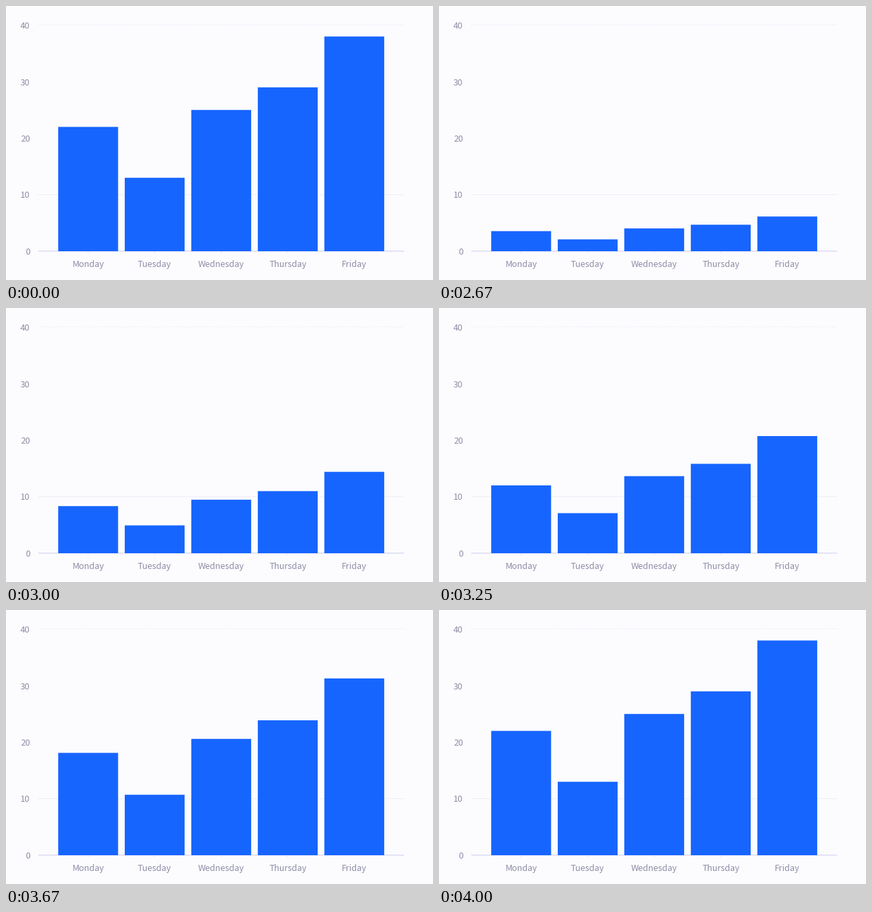
Write a matplotlib script that moves like this. It is 622 by 400 pixels and loops after 4910 ms.

```python
import matplotlib.pyplot as plt
from matplotlib.animation import FuncAnimation
from matplotlib.patches import Rectangle

W, H, DPI = 622, 400, 100
PX = 72 / DPI                      # one pixel in points
LOOP, TICK = 4910, 10              # ms
START, STEP = 2420, 250 / 3        # growth start and step length, ms

DAYS = {"Monday": 22, "Tuesday": 13, "Wednesday": 25, "Thursday": 29, "Friday": 38}
LEFT, RIGHT, BASE, UNIT = 47, 580, 358, 8.25
PITCH = (RIGHT - LEFT) / 5.5
BAR_W = PITCH * 0.9

PAPER, BLUE, INK = "#fcfcff", "#1765ff", "#8e8ea6"
AXIS, AXIS_SOFT, GRID = "#dedef2", "#eaeaf8", "#e0e0ee"

fig = plt.figure(figsize=(W / DPI, H / DPI), dpi=DPI, facecolor=PAPER)
ax = fig.add_axes([0, 0, 1, 1])
ax.set_xlim(0, W)
ax.set_ylim(H, 0)
ax.axis("off")


def block(x, y, w, h, color, z=1):
    box = Rectangle((x, y), w, h, fc=color, lw=0, zorder=z)
    box.set_snap(False)
    return ax.add_patch(box)


def dots(y, gap):
    ax.plot([LEFT, RIGHT], [y, y], color=GRID, lw=PX, ls=(0, (1, gap)),
            dash_capstyle="butt", snap=False, zorder=1)


def label(x, y, text, ha):
    ax.text(x, y, text, ha=ha, va="baseline", color=INK,
            family="Noto Sans CJK JP", fontsize=12.5 * PX)


dots(27.5, 2)
dots(275.5, 1)
block(LEFT, 357, RIGHT - LEFT, 1, AXIS)
block(LEFT, 358, RIGHT - LEFT, 1, AXIS_SOFT)

for value in range(0, 41, 10):
    label(35, BASE + 5 - value * UNIT, str(value), "right")

bars = []
for i, day in enumerate(DAYS):
    x = (LEFT + RIGHT) / 2 + (i - 2) * PITCH
    label(x, 381, day, "center")
    if i < 4:
        block(int(x - 0.4), 358, 1, 3, AXIS)
    bars.append(block(x - BAR_W / 2, BASE, BAR_W, 0, BLUE, 2))


def growth(t):
    """Share of full height: linear, in steps, with a slight early lag."""
    if t < START:
        return 1
    k = int((t - START + TICK - 0.1) / STEP)
    return 1 if k > 18 else k / 18 - 0.01 * min(k / 6, 1)


def draw(frame):
    share = growth(frame * TICK)
    for bar, value in zip(bars, DAYS.values()):
        bar.set_height(-value * UNIT * share)
    return bars


anim = FuncAnimation(fig, draw, frames=LOOP // TICK, interval=TICK,
                     repeat=True, repeat_delay=0, blit=False)
plt.show()
```
